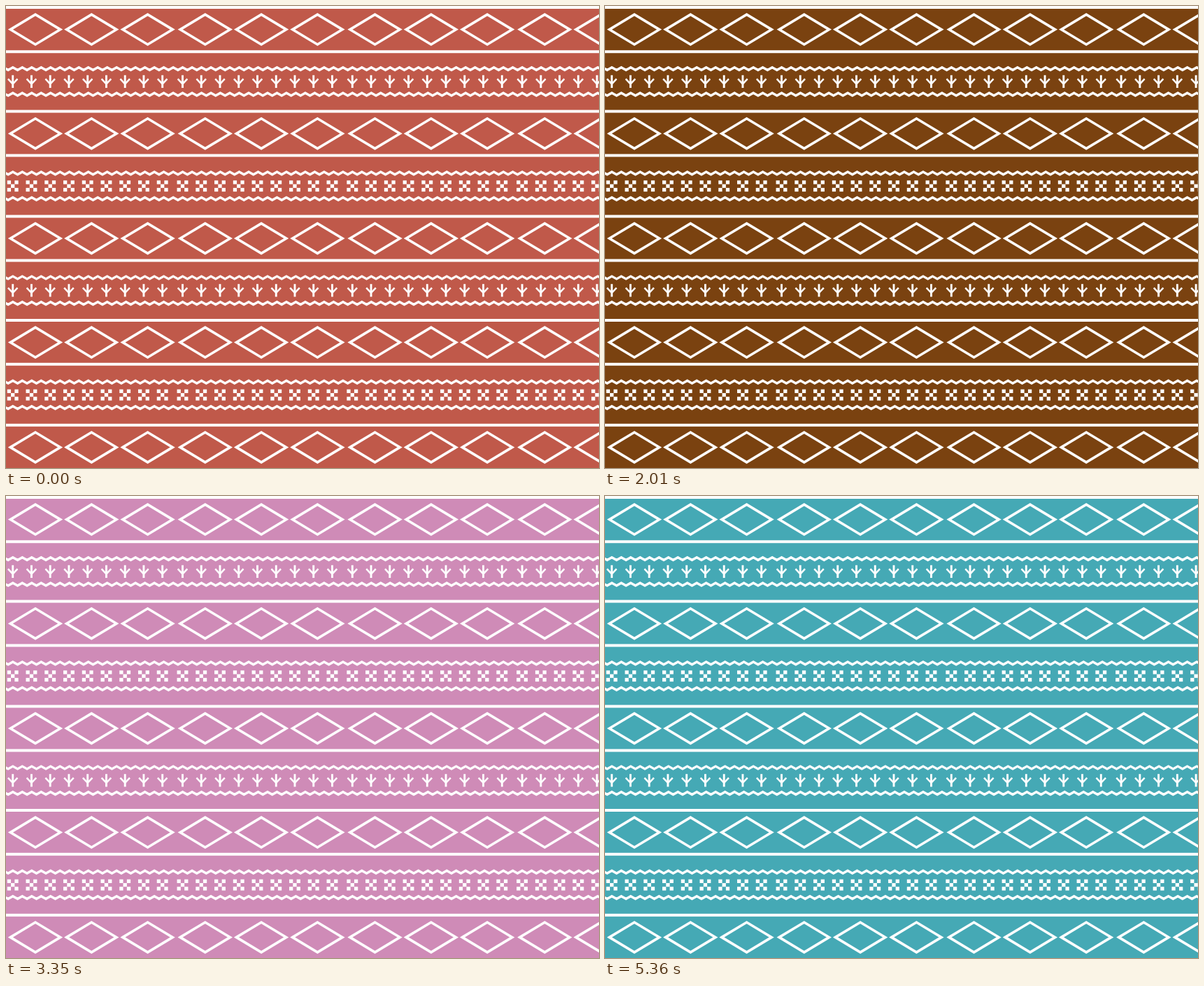
An HTML page with a canvas that plays this animation: 848x660 px, repeating every 6030 ms.

```html
<!DOCTYPE html>
<html lang="en">
<head>
<meta charset="utf-8">
<title>Knit pattern</title>
<style>
  html, body { margin: 0; width: 100%; height: 100%; overflow: hidden; }
  canvas { display: block; }
</style>
</head>
<body>
<canvas id="stage" width="848" height="660"></canvas>
<script>
const ctx = document.getElementById('stage').getContext('2d');
const STEP = 670;
const COLORS = ['#c0594a', '#f4c09a', '#b88254', '#7a4210', '#a56864',
                '#cf8bb7', '#35a3b8', '#3da6b7', '#45a9b5'];
const TILE_W = 242.8, TILE_H = 298.4;
const DIAMOND_PITCH = 80.3, MOTIF_PITCH = 26.75, WAVE = TILE_W / 18;

function stroke(points, width, closed = false) {
  ctx.lineWidth = width;
  ctx.beginPath();
  for (const [x, y] of points) ctx.lineTo(x, y);
  if (closed) ctx.closePath();
  ctx.stroke();
}

function diamond(x, y) {
  stroke([[x - 35.7, y], [x, y - 21.4], [x + 35.7, y], [x, y + 21.4]], 3.6, true);
}

function twig(x, y) {
  stroke([[x, y - 9], [x, y + 9.2]], 2.9);
  stroke([[x - 6.8, y - 3.6], [x, y + 3.6], [x + 6.8, y - 3.6]], 2.5);
}

function checker(x, y) {
  const cell = 5.3;
  for (let i = -1; i <= 1; i++)
    for (let j = -1; j <= 1; j++)
      if ((i + j) % 2 === 0)
        ctx.fillRect(x + (i - 0.5) * cell, y + (j - 0.5) * cell, cell, cell);
}

function zigzag(y) {
  const points = [];
  for (let i = -2; i < 130; i++)
    points.push([9.8 + i * WAVE / 2, y + (i % 2 ? 1.9 : -1.9)]);
  stroke(points, 3.4);
}

// Each tile column repeats a row of evenly spaced motifs.
function row(motif, x, y, pitch, count) {
  for (let tile = 0; tile < 4; tile++)
    for (let i = 0; i < count; i++) motif(x + tile * TILE_W + i * pitch, y);
}

function drawTile(top) {
  for (const y of [2, 65.2, 150.6, 213.4]) stroke([[0, top + y], [848, top + y]], 4);
  for (const y of [33.6, 182.2]) row(diamond, 42, top + y, DIAMOND_PITCH, 3);
  for (const y of [89.6, 126.2, 238.8, 275.3]) zigzag(top + y);
  row(twig, 9.7, top + 107.8, MOTIF_PITCH, 9);
  row(checker, 9.7, top + 257.2, MOTIF_PITCH, 9);
}

function render(now) {
  ctx.fillStyle = COLORS[Math.floor(now / STEP) % COLORS.length];
  ctx.fillRect(0, 0, 848, 660);
  ctx.fillStyle = ctx.strokeStyle = '#fff';
  ctx.fillRect(0, 0, 848, 2);
  for (let i = 0; i < 3; i++) drawTile(i * TILE_H);
}

const start = performance.now();
function tick() {
  render(performance.now() - start);
  requestAnimationFrame(tick);
}
tick();
</script>
</body>
</html>
```
